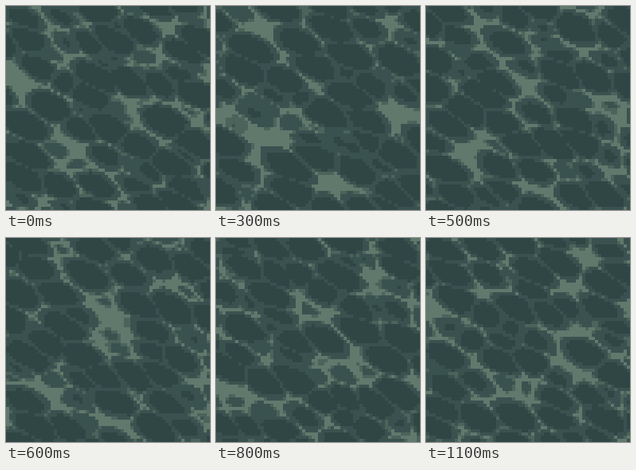
Recreate the animation shown at these times as an HTML page with a canvas. Size 256 by 256 pixels, loop 1200 ms.

```html
<!DOCTYPE html>
<html lang="en">
<head>
<meta charset="utf-8">
<title>Water</title>
<style>
  html, body { margin: 0; width: 100%; height: 100%; overflow: hidden; background: #3a524f; }
  canvas { display: block; width: 100vw; height: 100vh; image-rendering: pixelated; }
</style>
</head>
<body>
<canvas id="water" width="64" height="64"></canvas>
<script>
const GRID = 64, SIZE = 256, LOOP = 1200, STEP = 100;
const SHADES = [[48, 70, 69], [58, 82, 79], [75, 99, 91], [97, 120, 109]];
const SHARES = [0.5, 0.83, 0.89]; // part of the surface below each brighter shade

// Cells are tilted ellipses that swell and shrink over time.
const TILT = 0.48, LONG = 32, SHORT = 17, LIFE = 300;
const COS = Math.cos(TILT), SIN = Math.sin(TILT);
const CELL_COUNT = 96, TRIES = 40;

// Key points as x, y and time in ms: the main dark cells and bright knots.
const mainCells = [
  [105, 46, 180], [78, 45, 930], [166, 30, 1060], [167, 111, 310],
  [56, 127, 60], [76, 97, 1000], [126, 188, 220], [25, 150, 1180],
  [220, 90, 1000], [182, 116, 740], [135, 128, 920], [188, 28, 520]
];
const knots = [
  [58, 30, 200], [120, 95, 480], [240, 135, 250], [75, 170, 150],
  [155, 224, 280], [50, 190, 480], [178, 168, 980], [12, 88, 1130],
  [200, 25, 1080], [144, 232, 640], [206, 46, 720], [10, 188, 860]
];

let seed = 7;
function random() {
  seed = (seed * 16807) % 2147483647;
  return seed / 2147483647;
}

const wrap = (d, span) => d - span * Math.round(d / span);

function distance([ax, ay, at], [bx, by, bt]) {
  const dx = wrap(ax - bx, SIZE), dy = wrap(ay - by, SIZE);
  const u = (dx * COS + dy * SIN) / LONG;
  const v = (dy * COS - dx * SIN) / SHORT;
  const w = wrap(at - bt, LOOP) / LIFE;
  return Math.sqrt(u * u + v * v + w * w);
}

const nearest = (points, p) =>
  points.reduce((best, q) => Math.min(best, distance(p, q)), Infinity);

// Fill the rest evenly: of several random places, keep the emptiest.
function growCells() {
  const cells = [...mainCells];
  while (cells.length < CELL_COUNT) {
    const taken = [...cells, ...knots];
    let best, room = -1;
    for (let i = 0; i < TRIES; i++) {
      const p = [random() * SIZE, random() * SIZE, random() * LOOP];
      const d = nearest(taken, p);
      if (d > room) [best, room] = [p, d];
    }
    cells.push(best);
  }
  return cells;
}

// Brightness grows away from cell centres, along borders and at knots.
function brightness(cells, p) {
  let first = Infinity, second = Infinity;
  for (const cell of cells) {
    const d = distance(p, cell);
    if (d < first) [first, second] = [d, first];
    else if (d < second) second = d;
  }
  const border = Math.max(0, 1 - (second - first) / 0.3);
  const glow = Math.max(0, 1 - nearest(knots, p));
  return first + 0.3 * border + 0.4 * glow;
}

function makeField(cells, t) {
  const scale = SIZE / GRID;
  return Float32Array.from({ length: GRID * GRID }, (_, i) => brightness(cells, [
    (i % GRID + 0.5) * scale, (Math.floor(i / GRID) + 0.5) * scale, t
  ]));
}

const cells = growCells();
const fields = Array.from({ length: LOOP / STEP }, (_, i) => makeField(cells, i * STEP));
const levels = fields.map(field => {
  const sorted = field.slice().sort();
  return SHARES.map(share => sorted[Math.floor(share * sorted.length)]);
});

const ctx = document.getElementById('water').getContext('2d');
const image = ctx.createImageData(GRID, GRID);
let shown = -1;

function draw(index) {
  fields[index].forEach((value, i) => {
    const shade = SHADES[levels[index].filter(level => value >= level).length];
    image.data.set([...shade, 255], i * 4);
  });
  ctx.putImageData(image, 0, 0);
}

function tick() {
  const index = Math.floor(performance.now() % LOOP / STEP);
  if (index !== shown) draw(shown = index);
  requestAnimationFrame(tick);
}
tick();
</script>
</body>
</html>
```
